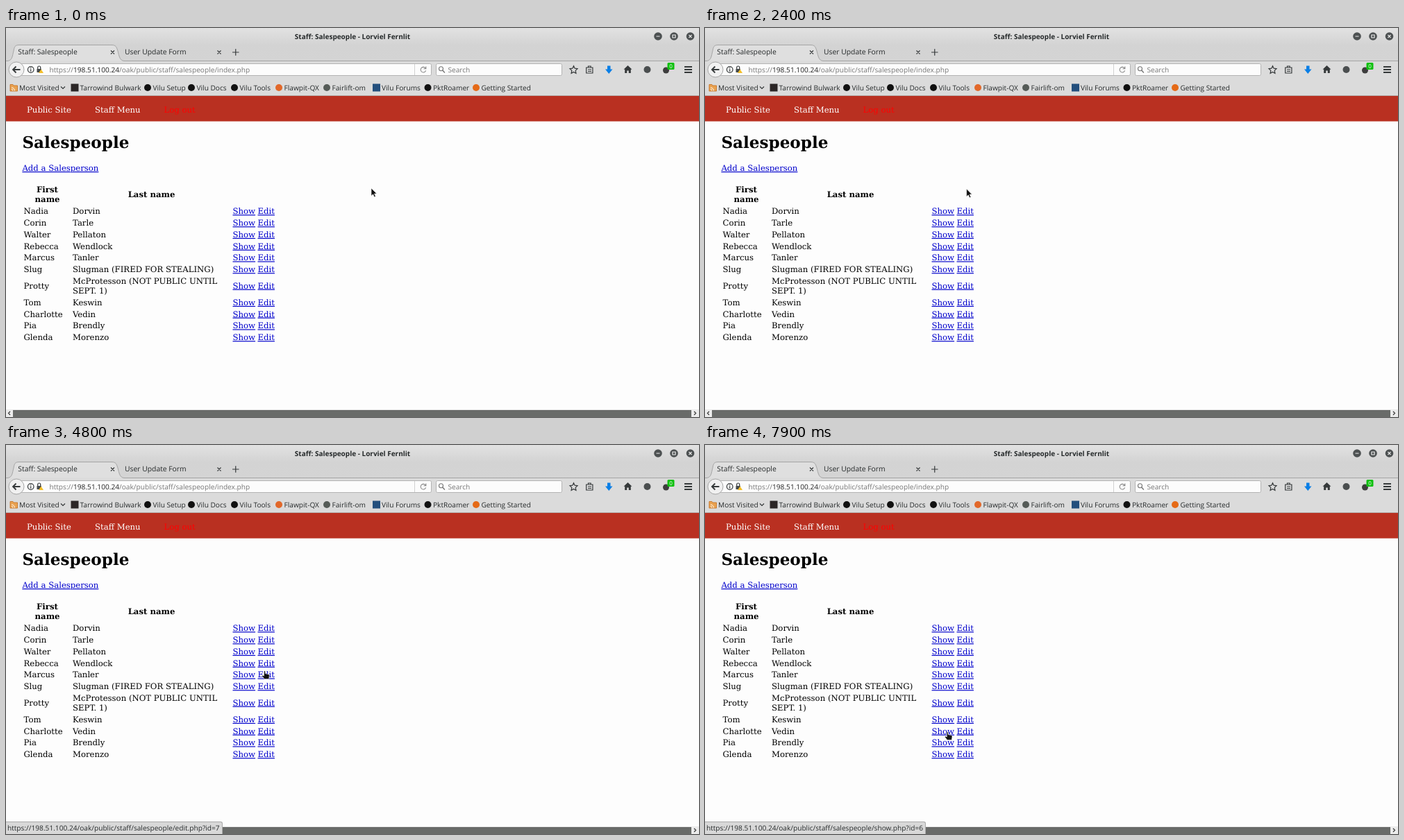
An HTML page that plays this animation: 998 px wide and 561 px high, repeating every 8 s.

```html
<!DOCTYPE html>
<html lang="en">
<head>
<meta charset="utf-8">
<title>Staff: Salespeople</title>
<style>
  html, body { margin: 0; width: 100%; height: 100%; overflow: hidden; background: #fdfdfd; }
  #stage { position: absolute; left: 0; top: 0; width: 998px; height: 561px; overflow: hidden; text-rendering: geometricPrecision; }
  svg { position: absolute; left: 0; top: 0; }
  .ui { font: 10.15px "Open Sans", "Noto Sans", sans-serif; fill: #262a2b; }
  .tab { font-size: 10.35px; }
  .title { font-weight: 700; font-size: 10px; text-anchor: middle; }
  .dim { fill: #777; }
  .page { font: 11.69px "DejaVu Serif", "Noto Serif", serif; fill: #000; }
  .big { font-size: 23.1px; font-weight: 700; }
  .th { font-weight: 700; text-anchor: middle; }
  .link { fill: #0000cc; text-decoration: underline; }
  .nav { fill: #fff; }
  .out { fill: #f00; }
  .line { fill: none; stroke: #35393a; stroke-width: 1.2; }
  .thick { stroke-width: 1.8; }
  #status {
    position: absolute; left: 0; bottom: 0; height: 18px; box-sizing: border-box;
    padding: 0 3px 0 2px; border: solid #aaa; border-width: 1px 1px 0 0;
    border-radius: 0 3px 0 0; background: #d8d8d8; color: #262a2b;
    font: 10.15px/17px "Open Sans", "Noto Sans", sans-serif; white-space: nowrap;
  }
</style>
</head>
<body>
<div id="stage">
<svg width="998" height="561" viewBox="0 0 998 561">
  <defs>
    <linearGradient id="bar" x2="0" y2="1">
      <stop offset="0" stop-color="#e2e2e2"/>
      <stop offset=".25" stop-color="#d3d3d3"/>
      <stop offset="1" stop-color="#d6d6d6"/>
    </linearGradient>
  </defs>
  <rect width="998" height="561" fill="#fdfdfd"/>
  <rect width="998" height="98" fill="url(#bar)"/>
  <rect y="47" width="998" height="51" fill="#dbdbdb"/>

  <!-- window title and buttons -->
  <text class="ui title" x="499" y="15.5">Staff: Salespeople - Lorviel Fernlit</text>
  <g fill="#4d5152">
    <circle cx="939" cy="12" r="5.8"/><circle cx="962" cy="12" r="5.8"/><circle cx="985.5" cy="12" r="5.8"/>
  </g>
  <path d="M936.5 12h5M960 10h4v4h-4zM983.5 10l4 4m0-4l-4 4" fill="none" stroke="#eee" stroke-width="1.2"/>

  <!-- tabs -->
  <path d="M0 47.5H2C9 47 9 41 11 33C12 27 13 24.5 19 24.5H152C158 24.5 159 27 161 33C163 41 164 47 170 47.5H998" fill="#dfdfdf" stroke="#a5a5a5"/>
  <text class="ui tab" x="17.3" y="38.4">Staff: Salespeople</text>
  <text class="ui tab" x="171" y="38.4">User Update Form</text>
  <path class="line" d="M151 32.5l5 5m0-5l-5 5M304.5 32.5l5 5m0-5l-5 5"/>
  <path class="line" d="M326 35h9.5M330.75 30.25v9.5"/>

  <!-- address and search -->
  <rect x="20.5" y="51.5" width="592" height="17" rx="2" fill="#fcfcfc" stroke="#b3b3b3"/>
  <circle cx="15" cy="60" r="11" fill="#f1f1f1" stroke="#a6a6a6"/>
  <path class="line thick" d="M20.5 60H10.5M14.5 55.5L10 60l4.5 4.5"/>
  <circle class="line" cx="35.7" cy="60" r="4.3"/>
  <path class="line" d="M35.7 57v1.2M35.7 59.3v3.4"/>
  <path d="M44.5 59h6.5v5h-6.5z" fill="#45494a"/>
  <path class="line" d="M45.7 59v-2a2 2 0 0 1 4 0v2"/>
  <path d="M50.5 59.5l3.5 5.5h-7z" fill="#f4bf2a"/>
  <text class="ui dim" x="62.5" y="63.6">https://<tspan fill="#222">198.51.100.24</tspan>/oak/public/staff/salespeople/index.php</text>
  <path d="M588.5 52v16" stroke="#d0d0d0"/>
  <path d="M604.3 58.3a3.8 3.8 0 1 0 .3 3M604.8 55.5v3.3h-3.3" fill="none" stroke="#888" stroke-width="1.1"/>
  <rect x="619.5" y="51.5" width="181" height="17" rx="2" fill="#fcfcfc" stroke="#b3b3b3"/>
  <circle cx="626.5" cy="58.8" r="3" fill="none" stroke="#777" stroke-width="1.1"/>
  <path d="M628.7 61l3.2 3.5" stroke="#777" stroke-width="1.4"/>
  <text class="ui dim" x="636.5" y="63.6">Search</text>

  <!-- toolbar -->
  <path class="line" d="M817.5 54.7l1.6 3.5 3.9.5-2.8 2.7.7 3.9-3.4-1.9-3.4 1.9.7-3.9-2.8-2.7 3.9-.5z"/>
  <path class="line" d="M835.7 57h9.2v8h-9.2zM838.5 56.5v-1.5h3.6v1.5M838 60h5M838 62.5h5"/>
  <path d="M866 54.5h4.5v5h3L868.25 66 863 59.5h3z" fill="#0a7fe6"/>
  <path d="M895.5 54l6 5.8h-1.7v5.2h-3v-3.5h-2.6v3.5h-3v-5.2h-1.7z" fill="#35393a"/>
  <circle cx="923.5" cy="60" r="5" fill="#4a4e4f"/>
  <circle cx="950.5" cy="61" r="4.5" fill="#3d3d3d"/>
  <rect x="952.5" y="50" width="10" height="10" rx="1.5" fill="#10c010"/>
  <text class="ui" x="957.5" y="58" text-anchor="middle" style="fill:#fff;font-size:8px">0</text>
  <path class="line thick" d="M977 56h11M977 60h11M977 64h11"/>

  <!-- bookmarks -->
  <path d="M6 81.5h4l1 1.5h5.5v8H6z" fill="#e9a250" stroke="#c36c1c" stroke-width=".8"/>
  <path d="M8 88.5a2 2 0 0 1 2 2M8 86a4.5 4.5 0 0 1 4.5 4.5" fill="none" stroke="#fff"/>
  <path class="line" d="M79 84.5l3 3 3-3"/>
  <g id="marks"></g>

  <!-- web page -->
  <path d="M0 97.5h998" stroke="#b5aeac"/>
  <rect y="98" width="998" height="36.6" fill="#b93021"/>
  <g class="page" id="page">
    <text class="nav" x="30" y="122">Public Site</text>
    <text class="nav" x="128" y="122">Staff Menu</text>
    <text class="out" x="227.5" y="122">Log out</text>
    <text class="big" x="23.4" y="173.3">Salespeople</text>
    <text class="link" x="23.4" y="206">Add a Salesperson</text>
    <text class="th" x="59.5" y="237">First</text>
    <text class="th" x="59.5" y="251">name</text>
    <text class="th" x="209.5" y="244">Last name</text>
  </g>

  <!-- scroll bar -->
  <rect y="550" width="998" height="11" fill="#ececec"/>
  <rect x="10" y="551" width="977" height="10" fill="#696b69"/>
  <path d="M6 553l-2.5 2.5 2.5 2.5M991 553l2.5 2.5-2.5 2.5" fill="none" stroke="#333" stroke-width="1.2"/>
</svg>
<div id="status"></div>
<svg width="998" height="561" viewBox="0 0 998 561">
  <g id="cursor" fill="#111" stroke="#fff" stroke-width=".6" stroke-linejoin="round">
    <path id="arrow" d="M0 0v11.2l2.6-2.4 1.8 4 1.9-.9-1.8-3.9h3.4z"/>
    <path id="hand" d="M-.8 .2Q.2-1 1.2 .2V3.6L6 4.6Q7.3 5 7 6.9L6.3 11.4H-.2L-3.5 7.2Q-3.6 5.8-2.3 6.1L-.8 7z"/>
  </g>
</svg>
</div>
<script>
const LOOP = 8000, STEP = 100;
const $ = id => document.getElementById(id);

function add(parent, tag, attrs, text = "") {
  const el = document.createElementNS("http://www.w3.org/2000/svg", tag);
  for (const k in attrs) el.setAttribute(k, attrs[k]);
  el.textContent = text;
  parent.appendChild(el);
}

// text x, label, icon shape and colour
[
  [19, "Most Visited"],
  [106.5, "Tarrowind Bulwark", "rect", "#2b2626"],
  [211.5, "Vilu Setup", "circle", "#111"],
  [274.5, "Vilu Docs", "circle", "#111"],
  [336.5, "Vilu Tools", "circle", "#111"],
  [400.5, "Flawpit-QX", "circle", "#e2682a"],
  [469.5, "Fairlift-om", "circle", "#555b57"],
  [541, "Vilu Forums", "rect", "#234f7d"],
  [615, "PktRoamer", "circle", "#111"],
  [684.5, "Getting Started", "circle", "#e56a17"]
].forEach(([x, label, shape, fill]) => {
  const m = $("marks");
  if (shape === "rect") add(m, shape, { x: x - 13, y: 80.5, width: 11, height: 11, fill });
  if (shape === "circle") add(m, shape, { cx: x - 7.5, cy: 86, r: 5, fill });
  add(m, "text", { class: "ui", x, y: 89.8 }, label);
});

// centre y, first name, last name, record id
const people = [
  [264, "Nadia", "Dorvin", 5],
  [281, "Corin", "Tarle", 1],
  [297.7, "Walter", "Pellaton", 3],
  [314.5, "Rebecca", "Wendlock", 4],
  [331.2, "Marcus", "Tanler", 7],
  [348, "Slug", "Slugman (FIRED FOR STEALING)", 9],
  [371.5, "Protty", "McProtesson (NOT PUBLIC UNTIL|SEPT. 1)", 10],
  [395.7, "Tom", "Keswin", 2],
  [412.4, "Charlotte", "Vedin", 6],
  [429.2, "Pia", "Brendly", 8],
  [446, "Glenda", "Morenzo", 11]
];
people.forEach(([cy, first, last]) => {
  const put = (x, y, text, cls = "") => add($("page"), "text", { x, y, class: cls }, text);
  const y = cy + 4.2, lines = last.split("|");
  put(25.5, y, first);
  lines.forEach((s, i) => put(96, y + (i - (lines.length - 1) / 2) * 13.8, s));
  put(326.5, y, "Show", "link");
  put(362.5, y, "Edit", "link");
});

// pointer tip: time, x, y
const path = [
  [0, 526, 231], [1000, 526, 231], [1600, 378, 224], [2200, 378, 224],
  [2900, 371, 264.5], [3300, 371, 264.5], [3700, 371, 284], [4200, 371, 284],
  [5500, 374, 379], [6300, 374, 379], [7400, 349, 414], [8000, 349, 414]
];
function pointer(t) {
  const i = path.findIndex(p => p[0] > t);
  const [t0, x0, y0] = path[i - 1], [t1, x1, y1] = path[i];
  const u = (t - t0) / (t1 - t0), e = u * u * (3 - 2 * u);
  return [x0 + (x1 - x0) * e, y0 + (y1 - y0) * e];
}

function draw(now) {
  const t = Math.floor((now % LOOP) / STEP) * STEP;
  const [x, y] = pointer(t);
  const over = y > 257;
  $("cursor").setAttribute("transform", `translate(${x} ${y})`);
  $("arrow").style.display = over ? "none" : "";
  $("hand").style.display = over ? "" : "none";

  const near = people.reduce((a, b) => Math.abs(b[0] - y) < Math.abs(a[0] - y) ? b : a);
  const action = x < 361 ? "show" : "edit";
  $("status").style.display = t >= 3400 ? "" : "none";
  $("status").textContent =
    `https://198.51.100.24/oak/public/staff/salespeople/${action}.php?id=${near[3]}`;
  requestAnimationFrame(draw);
}
draw(performance.now());
</script>
</body>
</html>
```
